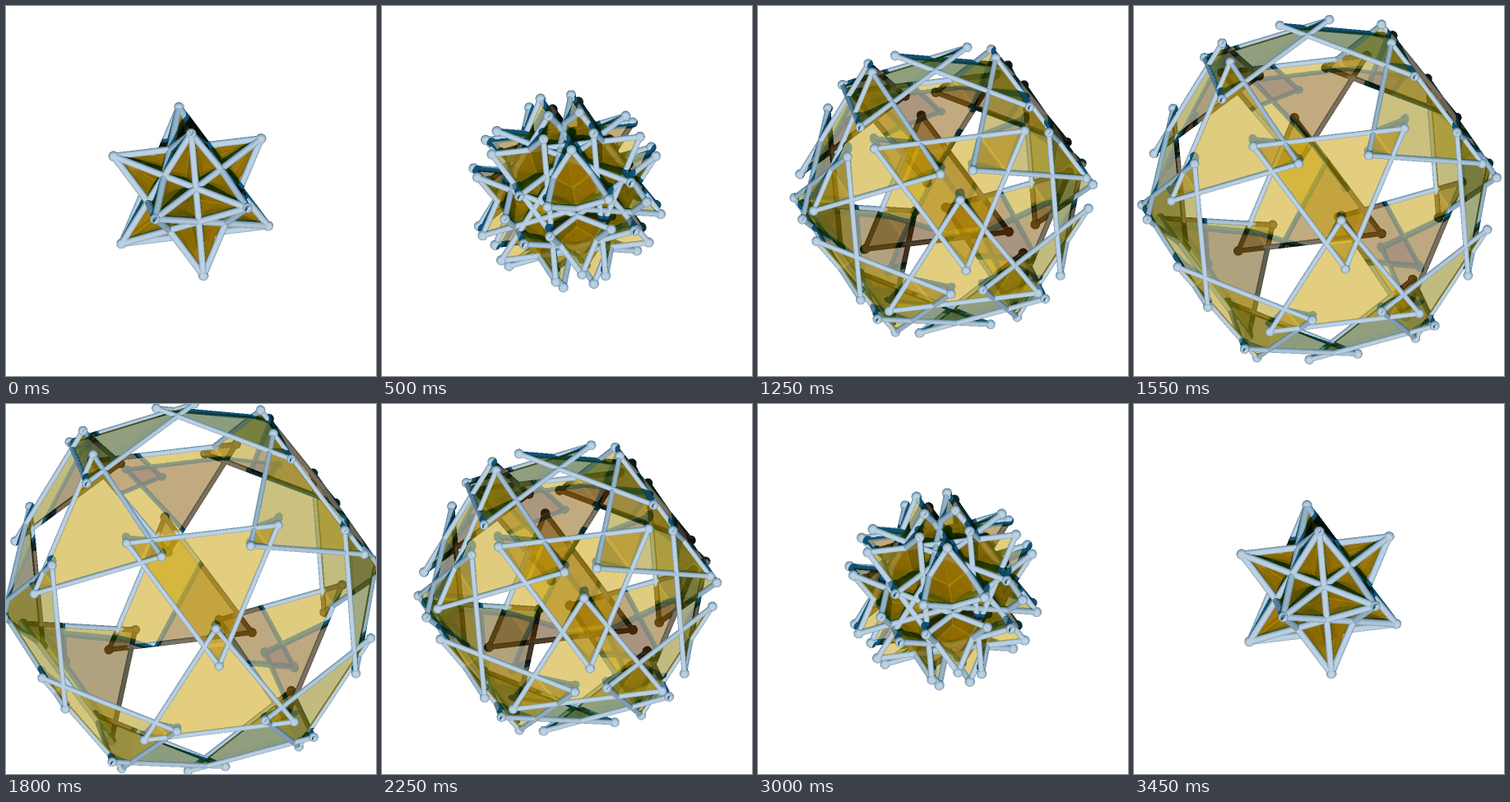
Write an HTML page with a canvas that moves like this. It is 450 by 450 pixels and loops after 3500 ms.

```html
<!DOCTYPE html>
<html lang="en">
<head>
<meta charset="utf-8">
<title>Expanding great icosahedron</title>
<style>
  html, body { margin: 0; width: 100%; height: 100%; overflow: hidden; background: #fff; }
  canvas { display: block; width: 450px; height: 450px; }
</style>
</head>
<body>
<canvas id="stage" width="900" height="900"></canvas>
<script>
const N = 900, SCALE = 2, CAMERA = 7000, RADIUS = 106.5;
const STEP_MS = 50, STEPS = 70, HOLD = 5, SPEED = 6.52;

const dot = (a, b) => a[0] * b[0] + a[1] * b[1] + a[2] * b[2];
const cross = (a, b) => [a[1] * b[2] - a[2] * b[1], a[2] * b[0] - a[0] * b[2], a[0] * b[1] - a[1] * b[0]];
const sub = (a, b) => a.map((v, i) => v - b[i]);
const mul = (a, k) => a.map(v => v * k);
const add = (...vs) => [0, 1, 2].map(i => vs.reduce((sum, v) => sum + v[i], 0));
const unit = a => mul(a, 1 / Math.hypot(...a));
const clamp01 = v => Math.max(0, Math.min(1, v));

const LIGHT = unit([0, 0.255, 1]);

// Orientation of the solid in view space: x right, y down, z towards the viewer
const axisZ = unit([-179.5, 21.5, 18.5]);
const axisX = unit(cross([-9.5, -105.5, 34.2], axisZ));
const axisY = cross(axisZ, axisX);

const PHI = (1 + Math.sqrt(5)) / 2;
const vertices = [];
for (const s of [-1, 1]) for (const t of [-PHI, PHI])
  for (const [x, y, z] of [[0, s, t], [s, t, 0], [t, 0, s]])
    vertices.push(mul(unit(add(mul(axisX, x), mul(axisY, y), mul(axisZ, z))), RADIUS));

// Great icosahedron: all triples of vertices that are pairwise second neighbours
const joined = (a, b) => Math.abs(dot(a, b) / RADIUS ** 2 + 1 / Math.sqrt(5)) < 0.01;
const faces = [];
vertices.forEach((a, i) => vertices.forEach((b, j) => vertices.forEach((c, k) => {
  if (i < j && j < k && joined(a, b) && joined(b, c) && joined(a, c))
    faces.push({ corners: [a, b, c], normal: unit(add(a, b, c)) });
})));

const ctx = document.getElementById("stage").getContext("2d");
const image = ctx.createImageData(N, N);
const pixels = new Uint32Array(image.data.buffer);
const makeBuffer = () => ({ depth: new Float32Array(N * N), normals: new Float32Array(N * N * 3) });
const view = makeBuffer(), shadowMap = makeBuffer();
const { depth, normals } = view;
let tris = [];

function project([x, y, z]) {
  const s = SCALE * CAMERA / (CAMERA - z);
  return [N / 2 + x * s, N / 2 + y * s, z * SCALE];
}

// The light lies in the y-z plane, so its view is a turn about the x axis
const lightY = (y, z) => N / 2 + (y - N / 2) * LIGHT[2] - z * LIGHT[1];
const lightZ = (y, z) => (y - N / 2) * LIGHT[1] + z * LIGHT[2];
const toLight = ([x, y, z]) => [x, lightY(y, z), lightZ(y, z)];

// Coefficients of the affine function dir . (p - origin) / scale
const affine = (dir, origin, scale) => [...mul(dir, 1 / scale), -dot(dir, origin) / scale];
const at = (f, x, y, z) => f[0] * x + f[1] * y + f[2] * z + f[3];

function makeTriangle({ corners, normal }, expand) {
  const pts = corners.map(v => project(add(v, mul(normal, expand))));
  const e1 = sub(pts[1], pts[0]), e2 = sub(pts[2], pts[0]);
  const n = cross(e1, e2), lu = cross(LIGHT, e2), lv = cross(LIGHT, e1);
  const facing = dot(normal, LIGHT) * Math.sign(normal[2]);
  return {
    pts,
    height: affine([n[0], n[1], 0], pts[0], -n[2]),
    distance: affine(n, pts[0], -dot(n, LIGHT)),
    u: affine(lu, pts[0], dot(lu, e1)),
    v: affine(lv, pts[0], dot(lv, e2)),
    diffuse: clamp01(1.55 * facing - 0.1),
    filters: new Uint8Array(N / 2),
    stamp: new Int32Array(N / 2)
  };
}

// Number of tinted faces between a point and the light
function countFilters(x, y, z, self) {
  let count = 0;
  for (const tri of tris) {
    if (tri === self || at(tri.distance, x, y, z) < 4) continue;
    const u = at(tri.u, x, y, z);
    if (u < 0 || u > 1) continue;
    const v = at(tri.v, x, y, z);
    if (v >= 0 && u + v <= 1) count++;
  }
  return Math.min(count, 3);
}

// Rods and balls block the light entirely
function inShadow(x, y, z) {
  const row = Math.round(lightY(y, z));
  return row >= 0 && row < N && shadowMap.depth[row * N + x] > lightZ(y, z) + 5;
}

function plot(buffer, x, y, z, nx, ny, nz) {
  const i = y * N + x;
  if (z <= buffer.depth[i]) return;
  buffer.depth[i] = z;
  buffer.normals[3 * i] = nx;
  buffer.normals[3 * i + 1] = ny;
  buffer.normals[3 * i + 2] = nz;
}

const clampLow = v => Math.max(0, Math.ceil(v));
const clampHigh = v => Math.min(N - 1, Math.floor(v));

function drawBall(buffer, [cx, cy, cz], r) {
  for (let y = clampLow(cy - r); y <= clampHigh(cy + r); y++) {
    const half = Math.sqrt(Math.max(0, r * r - (y - cy) ** 2));
    for (let x = clampLow(cx - half); x <= clampHigh(cx + half); x++) {
      const h = Math.sqrt(Math.max(0, half * half - (x - cx) ** 2));
      plot(buffer, x, y, cz + h, (x - cx) / r, (y - cy) / r, h / r);
    }
  }
}

function drawRod(buffer, p, q, r) {
  const span = sub(q, p), length = Math.hypot(...span);
  const [ax, ay, az] = unit(span);
  const flat = Math.max(0.08, Math.hypot(ax, ay));
  const half = r * flat / Math.max(1e-6, Math.abs(ay));
  for (let y = clampLow(Math.min(p[1], q[1]) - r); y <= clampHigh(Math.max(p[1], q[1]) + r); y++) {
    const mid = p[0] + (y - p[1]) * ax / (ay || 1e-6);
    const from = clampLow(Math.max(mid - half, Math.min(p[0], q[0]) - r));
    const to = clampHigh(Math.min(mid + half, Math.max(p[0], q[0]) + r));
    for (let x = from; x <= to; x++) {
      const dx = x - p[0], dy = y - p[1];
      const along = (dx * ax + dy * ay) / (flat * flat);
      if (along < 0 || along > length) continue;
      const e = (dy * ax - dx * ay) / (flat * r);
      if (Math.abs(e) > 1) continue;
      const h = Math.sqrt(1 - e * e);
      plot(buffer, x, y, p[2] + along * az + h * r / flat,
        (-e * ay - h * ax * az) / flat, (e * ax - h * ay * az) / flat, h * flat);
    }
  }
}

function drawFrame(buffer, transform, rod, ball) {
  buffer.depth.fill(-1e9);
  for (const tri of tris) {
    const pts = tri.pts.map(transform);
    pts.forEach((p, i) => {
      drawRod(buffer, p, pts[(i + 1) % 3], rod);
      drawBall(buffer, p, ball);
    });
  }
}

function rodColour(i, x, y) {
  const z = depth[i], nz = normals[3 * i + 2];
  const facing = Math.max(0, normals[3 * i + 1] * LIGHT[1] + nz * LIGHT[2]);
  const key = inShadow(x, y, z) ? 0 : Math.min(1, 0.35 + 0.75 * facing);
  const fill = 0.75 + 0.25 * nz, filters = countFilters(x, y, z);
  return [
    (18 * fill + 170 * key) * 0.66 ** filters,
    (88 * fill + 123 * key) * 0.54 ** filters,
    (125 * fill + 105 * key) * 0.42 ** filters
  ];
}

// Face filters are sampled once per 2 x 2 block
function faceFilters(tri, x, y, z) {
  const cell = x >> 1, row = (y >> 1) + 1;
  if (tri.stamp[cell] !== row) {
    tri.stamp[cell] = row;
    tri.filters[cell] = countFilters(x, y, z, tri);
  }
  return tri.filters[cell];
}

function rowSpan({ pts }, y) {
  const xs = [];
  pts.forEach((a, i) => {
    const b = pts[(i + 1) % 3];
    if ((a[1] <= y) !== (b[1] <= y)) xs.push(a[0] + (y - a[1]) * (b[0] - a[0]) / (b[1] - a[1]));
  });
  return xs.sort((a, b) => a - b);
}

function composeRow(y) {
  const active = [];
  for (const tri of tris) {
    const [x0, x1] = rowSpan(tri, y);
    if (x1 !== undefined) active.push({ tri, x0, x1, z: 0 });
  }
  const hits = [];
  for (let x = 0; x < N; x++) {
    const i = y * N + x;
    let count = 0;
    for (const part of active) {
      if (x < part.x0 || x > part.x1) continue;
      part.z = at(part.tri.height, x, y, 0) + part.tri.pts[0][2];
      if (part.z <= depth[i]) continue;
      let k = count++;
      for (; k > 0 && hits[k - 1].z < part.z; k--) hits[k] = hits[k - 1];
      hits[k] = part;
    }
    const solid = depth[i] > -1e8;
    if (!count && !solid) continue;
    let r = 0, g = 0, b = 0, through = 1;
    for (let k = 0; k < count && through > 0.02; k++) {
      const { tri, z } = hits[k];
      const key = inShadow(x, y, z) ? 0 : tri.diffuse;
      const filters = faceFilters(tri, x, y, z);
      through /= 2;
      r += through * (25 + 175 * key) * 0.66 ** filters;
      g += through * (58 + 100 * key) * 0.54 ** filters;
    }
    const back = solid && through > 0.02 ? rodColour(i, x, y) : [255, 255, 255];
    r += through * back[0];
    g += through * back[1];
    b += through * back[2];
    pixels[i] = 0xff000000 | b << 16 | g << 8 | r;
  }
}

function render(level) {
  const expand = level * SPEED, progress = level / 30;
  const rod = SCALE * (3.4 - 0.3 * progress + 0.7 * Math.max(0, 1 - 4 * progress));
  const ball = SCALE * (6.2 - 0.5 * progress);
  pixels.fill(0xffffffff);
  tris = faces.map(face => makeTriangle(face, expand));
  drawFrame(view, p => p, rod, ball);
  drawFrame(shadowMap, toLight, rod, ball);
  for (let y = 0; y < N; y++) composeRow(y);
  ctx.putImageData(image, 0, 0);
}

let shown = -1;
function tick() {
  const step = Math.floor(performance.now() / STEP_MS) % STEPS;
  const level = Math.max(0, STEPS / 2 - Math.abs(STEPS / 2 - step) - HOLD);
  if (level !== shown) render(shown = level);
  requestAnimationFrame(tick);
}
tick();
</script>
</body>
</html>
```
